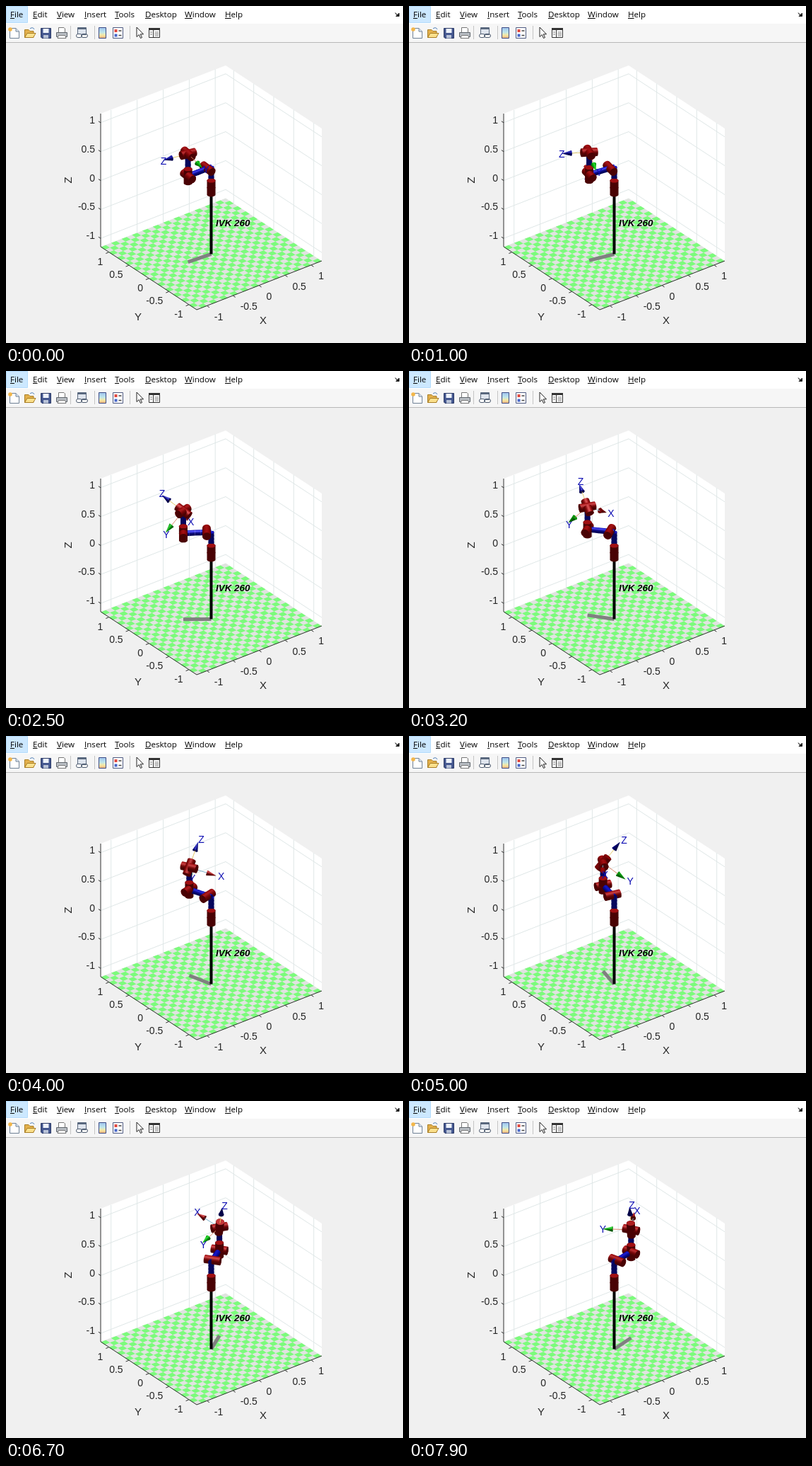
An HTML page with a canvas for the animation above (8000 ms loop, 562x476 px).

```html
<!DOCTYPE html>
<html lang="en">
<head>
<meta charset="utf-8">
<title>Robot arm plot</title>
<style>
  html, body { margin: 0; width: 562px; height: 476px; overflow: hidden; background: #f0f0f0; }
  svg, canvas { position: absolute; left: 0; top: 0; }
  nav { position: absolute; left: 0; top: 0; width: 562px; height: 24px;
        font: 11.6px/24px "Open Sans", "Noto Sans", sans-serif; color: #000; z-index: 1; }
  nav span { position: absolute; display: inline-block; white-space: nowrap; }
  nav span::first-letter { text-decoration: underline; }
  svg text { font-family: "Liberation Sans", Arial, sans-serif; font-size: 14px; fill: #262626; }
  svg .title { font-size: 15px; text-anchor: middle; }
</style>
</head>
<body>
<nav id="menu"></nav>
<svg width="562" height="476" viewBox="0 0 562 476">
  <path d="M0 0H562V25H0Z" fill="#fff"/>
  <path d="M0 25H562V51H0Z" fill="#f6f6f6"/>
  <path d="M.5 .5H30.5V23.5H.5Z" fill="#cce8ff" stroke="#b5dcfb"/>
  <path d="M0 51.5H562" stroke="#b8b8b8"/>
  <path d="M551 9.500Q552 12.500 555 13M556.500 10V14.500H552Z" fill="#222" stroke="#222"/>

  <g id="icons" stroke-linejoin="round">
    <path d="M5.500 31.500H14L18.500 36V45.500H5.500Z" fill="#fff" stroke="#6f8196"/>
    <path d="M14 31.500V36H18.500" fill="#dbe6f2" stroke="#6f8196"/>
    <circle cx="6" cy="33" r="2.800" fill="#f3b74a"/>
    <path d="M26.500 44.500V33.500H32L34 35.500H39V44.500Z" fill="#e3b04c" stroke="#a87d24"/>
    <path d="M26.500 44.500L30 38.500H42L38.500 44.500Z" fill="#fbe08c" stroke="#a87d24"/>
    <path d="M34 32Q38 29 40 33" fill="none" stroke="#4a7bb5"/>
    <path d="M49.500 31.500H63.500V45.500H51L49.500 44Z" fill="#44578f" stroke="#2c3a66"/>
    <path d="M52.500 32H60.500V38H52.500Z" fill="#eef3fb"/>
    <path d="M53 41H60V45.500H53Z" fill="#b9c3d8"/>
    <path d="M74.500 37V30.500H82L83.500 32V37" fill="#fff" stroke="#777"/>
    <path d="M71.500 37.500H86.500V43.500H71.500Z" fill="#b9bec4" stroke="#5f656c"/>
    <path d="M74.500 41.500H83.500L85 45.500H73Z" fill="#fff" stroke="#777"/>
    <path d="M91.500 28V47M125.500 28V47M175.500 28V47" stroke="#c4c4c4"/>
    <path d="M101.500 30.500H113.500V40.500H101.500Z" fill="#dfe5ee" stroke="#59687e"/>
    <path d="M102 32H113" stroke="#59687e" stroke-width="2"/>
    <rect x="99.500" y="39.500" width="8" height="5" rx="2.500" fill="#fff" stroke="#4c5a6e"/>
    <rect x="106.500" y="39.500" width="9" height="5" rx="2.500" fill="none" stroke="#4c5a6e"/>
    <linearGradient id="bar" x2="0" y2="1">
      <stop stop-color="#9fc3ee"/><stop offset=".45" stop-color="#bfe6ea"/>
      <stop offset=".7" stop-color="#f6e9a4"/><stop offset="1" stop-color="#f0b07c"/>
    </linearGradient>
    <path d="M131.500 30.500H141.500V45.500H131.500Z" fill="url(#bar)" stroke="#3d4c85"/>
    <path d="M151.500 30.500H165.500V45.500H151.500Z" fill="#fff" stroke="#505c82"/>
    <path d="M153.500 33H157.500V37H153.500Z" fill="#e0493f"/>
    <path d="M153.500 39.500H157.500V43.500H153.500Z" fill="#4766c9"/>
    <path d="M159.500 35H163.500M159.500 41.500H163.500" stroke="#444" stroke-width="1.500"/>
    <path d="M185 30V43.500L188.300 40.500L190.500 45.500L192.500 44.500L190.300 39.800H194.500Z" fill="#fff" stroke="#222"/>
    <path d="M202.500 31.500H217.500V44.500H202.500Z" fill="#fff" stroke="#333"/>
    <path d="M202 32.500H218" stroke="#333" stroke-width="3"/>
    <path d="M208.500 34V44" stroke="#333"/>
    <path d="M210.500 37H216M210.500 39.500H216M210.500 42H216M204 37H207M204 40H207" stroke="#777"/>
  </g>

  <path d="M134 152L311 84L447 173V360L311 272L134 340Z" fill="#fff"/>
  <path id="grid" fill="none" stroke="#dfe7e7"/>
  <g transform="matrix(73.750 -28.750 -56.670 -37.080 290.500 350.500)">
    <path d="M-1.200-1.200h2.400v2.400h-2.400z" fill="#e0e4e0"/>
    <path id="tiles" fill="#7cfb7c"/>
  </g>
  <path id="axes" fill="none" stroke="#303030"/>
  <g id="ticks"></g>
  <text class="title" x="364" y="449">X</text>
  <text class="title" x="187" y="444">Y</text>
  <text class="title" transform="translate(93 246) rotate(-90)">Z</text>
</svg>
<canvas id="view" width="562" height="476"></canvas>

<script>
const el = id => document.getElementById(id);
const ctx = el('view').getContext('2d');
const WIDE = 1.2, HIGH = 1.15, UNIT = 93.5, REACH = 0.425;

// World direction to pixels: right, down, toward the viewer
const dir = ([x, y, z]) => [73.75 * x - 56.67 * y, -28.75 * x - 37.08 * y - 81.7 * z, UNIT * (-0.53 * x - 0.68 * y + 0.5 * z)];
const add = (a, b, k = 1) => a.map((v, i) => v + b[i] * k);
const dot = (a, b) => a[0] * b[0] + a[1] * b[1] + a[2] * b[2];
const unit = v => { const n = Math.hypot(...v); return v.map(c => c / n); };
const project = p => add([290.5, 256.5, 0], dir(p));

function buildMenu() {
  const items = { File: 6, Edit: 38, View: 72, Insert: 111, Tools: 154, Desktop: 197, Window: 253, Help: 310 };
  el('menu').innerHTML = Object.entries(items)
    .map(([name, x]) => `<span style="left:${x}px">${name}</span>`).join('');
}

function buildAxes() {
  const at = (x, y, z) => project([x, y, z]).slice(0, 2).map(v => v.toFixed(1)).join(' ');
  const marks = [-1, -0.5, 0, 0.5, 1], W = WIDE, H = HIGH, T = WIDE + 0.055;
  let grid = '', axes = 'M134 152V340L270 429L447 360', labels = '', tiles = '';
  const label = (text, x, y, anchor) => {
    labels += `<text x="${x}" y="${y}" text-anchor="${anchor}">${text}</text>`;
  };
  for (const v of marks) {
    grid += `M${at(v, W, -H)}L${at(v, W, H)}M${at(W, v, -H)}L${at(W, v, H)}`;
    grid += `M${at(-W, W, v)}L${at(W, W, v)}L${at(W, -W, v)}`;
    axes += `M${at(v, -W, -H)}L${at(v, -T, -H)}M${at(-W, v, -H)}L${at(-T, v, -H)}M${at(-W, W, v)}L${at(-W, T, v)}`;
    const [xx, xy] = project([v, -W, -H]), [yx, yy] = project([-W, v, -H]);
    label(v, xx + 10, xy + 20, 'start');
    label(v, yx - 8, yy + 18, 'end');
    label(v, 126, project([-W, W, v])[1] + 1, 'end');
  }
  for (let i = 0; i < 24; i++)
    for (let j = 1 - i % 2; j < 24; j += 2)
      tiles += `M${(i / 10 - W).toFixed(2)} ${(j / 10 - W).toFixed(2)}h.1v.1h-.1z`;
  el('grid').setAttribute('d', grid);
  el('axes').setAttribute('d', axes);
  el('tiles').setAttribute('d', tiles);
  el('ticks').innerHTML = labels;
}

const RED = [215, 8, 12], BLUE = [18, 18, 270], GREEN = [0, 250, 10], NAVY = [0, 0, 210];
// Light from straight above, and its halfway vector to the viewer
const LIGHT = [0, -0.866, 0.5], HALF = [0, -0.5, 0.866];

function shade(color, normal) {
  const k = 0.34 + 0.36 * Math.max(0, dot(normal, LIGHT));
  const gloss = 80 * Math.max(0, dot(normal, HALF)) ** 14;
  return `rgb(${color.map(c => Math.min(255, c * k + gloss) | 0)})`;
}

// Enters a frame whose x axis follows the solid on screen
function solidFrame(a, axis, r, color) {
  const h = Math.max(1e-4, Math.hypot(axis[0], axis[1]));
  const side = [-axis[1] / h, axis[0] / h, 0];
  const front = [-axis[0] * axis[2] / h, -axis[1] * axis[2] / h, h];
  const fill = ctx.createLinearGradient(0, -r, 0, r);
  for (let i = 0; i <= 8; i++) {
    const s = i / 4 - 1;
    fill.addColorStop(i / 8, shade(color, add(side.map(v => v * s), front, Math.sqrt(1 - s * s))));
  }
  ctx.save();
  ctx.translate(a[0], a[1]);
  ctx.rotate(Math.atan2(axis[1], axis[0]));
  ctx.fillStyle = fill;
  return h;
}

function cap(x, r, axis, color, sign) {
  ctx.beginPath();
  ctx.ellipse(x, 0, r * Math.abs(axis[2]), r, 0, 0, 7);
  ctx.fillStyle = shade(color, axis.map(v => v * sign));
  ctx.fill();
}

function drawCylinder(a, b, r, color, first, last) {
  const span = add(b, a, -1), axis = unit(span);
  const len = Math.hypot(...span) * solidFrame(a, axis, r, color);
  const e = r * Math.abs(axis[2]), q = Math.PI / 2;
  ctx.beginPath();
  ctx.ellipse(len, 0, e, r, 0, -q, q);
  ctx.ellipse(0, 0, e, r, 0, q, 3 * q);
  ctx.fill();
  if (last && axis[2] > 0) cap(len, r, axis, color, 1);
  if (first && axis[2] < 0) cap(0, r, axis, color, -1);
  ctx.restore();
}

function drawCone(a, b, r, color) {
  const span = add(b, a, -1), axis = unit(span);
  const len = Math.hypot(...span) * solidFrame(a, axis, r, color);
  ctx.beginPath();
  ctx.ellipse(0, 0, r * Math.abs(axis[2]), r, 0, 0, 7);
  ctx.fill();
  ctx.beginPath();
  ctx.moveTo(len, 0);
  ctx.lineTo(0, r);
  ctx.lineTo(0, -r);
  ctx.fill();
  if (axis[2] < 0) cap(0, r, axis, color, -1);
  ctx.restore();
}

function line(a, b, color, width) {
  ctx.strokeStyle = color;
  ctx.lineWidth = width;
  ctx.beginPath();
  ctx.moveTo(a[0], a[1]);
  ctx.lineTo(b[0], b[1]);
  ctx.stroke();
}

let parts = [];
const put = (depth, draw) => parts.push({ depth, draw });

// Splits a long solid so that its pieces sort by depth
function pieces(a, b, n, bias, draw) {
  const span = add(b, a, -1);
  for (let i = 0; i < n; i++) {
    const p = add(a, span, i / n), q = add(a, span, (i + 1) / n);
    put((p[2] + q[2]) / 2 + bias, () => draw(p, q, i === 0, i === n - 1));
  }
}

const tube = (a, b, n, bias, r, color) =>
  pieces(a, b, n, bias, (p, q, first, last) => drawCylinder(p, q, r, color, first, last));
const link = (a, b) => tube(a, b, 4, 0, 4, BLUE);

function joint(center, axis) {
  const half = unit(dir(axis)).map(v => v * 11.5);
  tube(add(center, half, -1), add(center, half), 2, 5, 6, RED);
}

function arrow(origin, axis, name, color, thin) {
  const v = unit(dir(axis)).map(c => c * 44);
  const at = k => add(origin, v, k);
  pieces(origin, at(0.6), 3, 0, (p, q) => line(p, q, thin, 1));
  put(at(0.76)[2], () => drawCone(at(0.6), at(0.92), 3.8, color));
  put(at(1)[2], () => {
    ctx.fillStyle = '#1010b4';
    ctx.font = '14px "Liberation Sans", Arial, sans-serif';
    ctx.fillText(name, at(1)[0] - 1, at(1)[1] + 5);
  });
}

// Share of the joint move done: quintic ease, stepped at 10 Hz with short stalls
function progress(ms) {
  const n = Math.floor(ms / 100);
  const step = Math.max(0, n - 2 - (n >= 66) - (n >= 72));
  const u = 0.138 + step / 119;
  return u ** 3 * (10 - 15 * u + 6 * u * u);
}

function render(ms) {
  const s = progress(ms);
  const base = Math.PI * (1 - s), yaw = base - Math.PI * s, bend = base / 2, roll = -Math.PI * s;
  const [c1, s1] = [Math.cos(base), Math.sin(base)];
  const [ca, sa, cb, sb] = [Math.cos(yaw), Math.sin(yaw), Math.cos(bend), Math.sin(bend)];
  const [cg, sg] = [Math.cos(roll), Math.sin(roll)];
  const arm = (r, z) => project([r * c1, r * s1, z]);

  const shoulder = arm(0.07, 0.352), elbow = arm(REACH, 0.335), wrist = arm(REACH, 0.72);
  const up = [0, 0, 1], hinge = [-s1, c1, 0], pitch = [-sa, ca, 0];
  const toolZ = [ca * sb, sa * sb, cb], e1 = [ca * cb, sa * cb, -sb];
  const toolX = e1.map((v, i) => v * cg + pitch[i] * sg);
  const toolY = e1.map((v, i) => pitch[i] * cg - v * sg);

  ctx.clearRect(0, 0, 562, 476);
  line(project([0, 0, -HIGH]), arm(REACH, -HIGH), '#808080', 5);
  line(project([0, 0, -HIGH]), project([0, 0, 0]), '#000', 4);
  ctx.fillStyle = '#000';
  ctx.font = 'italic bold 13.4px "Liberation Sans", Arial, sans-serif';
  ctx.fillText('IVK 260', 297, 311);

  parts = [];
  joint(project([0, 0, 0]), up);
  link(project([0, 0, 0.12]), project([0, 0, 0.352]));
  link(project([0, 0, 0.352]), shoulder);
  joint(shoulder, hinge);
  link(shoulder, elbow);
  joint(elbow, hinge);
  joint(elbow, up);
  link(elbow, wrist);
  joint(wrist, pitch);
  joint(wrist, toolZ);
  arrow(wrist, toolX, 'X', RED, '#7fb2cc');
  arrow(wrist, toolY, 'Y', GREEN, '#d98468');
  arrow(wrist, toolZ, 'Z', NAVY, '#e2c768');
  parts.sort((a, b) => a.depth - b.depth).forEach(p => p.draw());
}

function tick() {
  render(performance.now() % 8000);
  requestAnimationFrame(tick);
}

buildMenu();
buildAxes();
tick();
</script>
</body>
</html>
```
